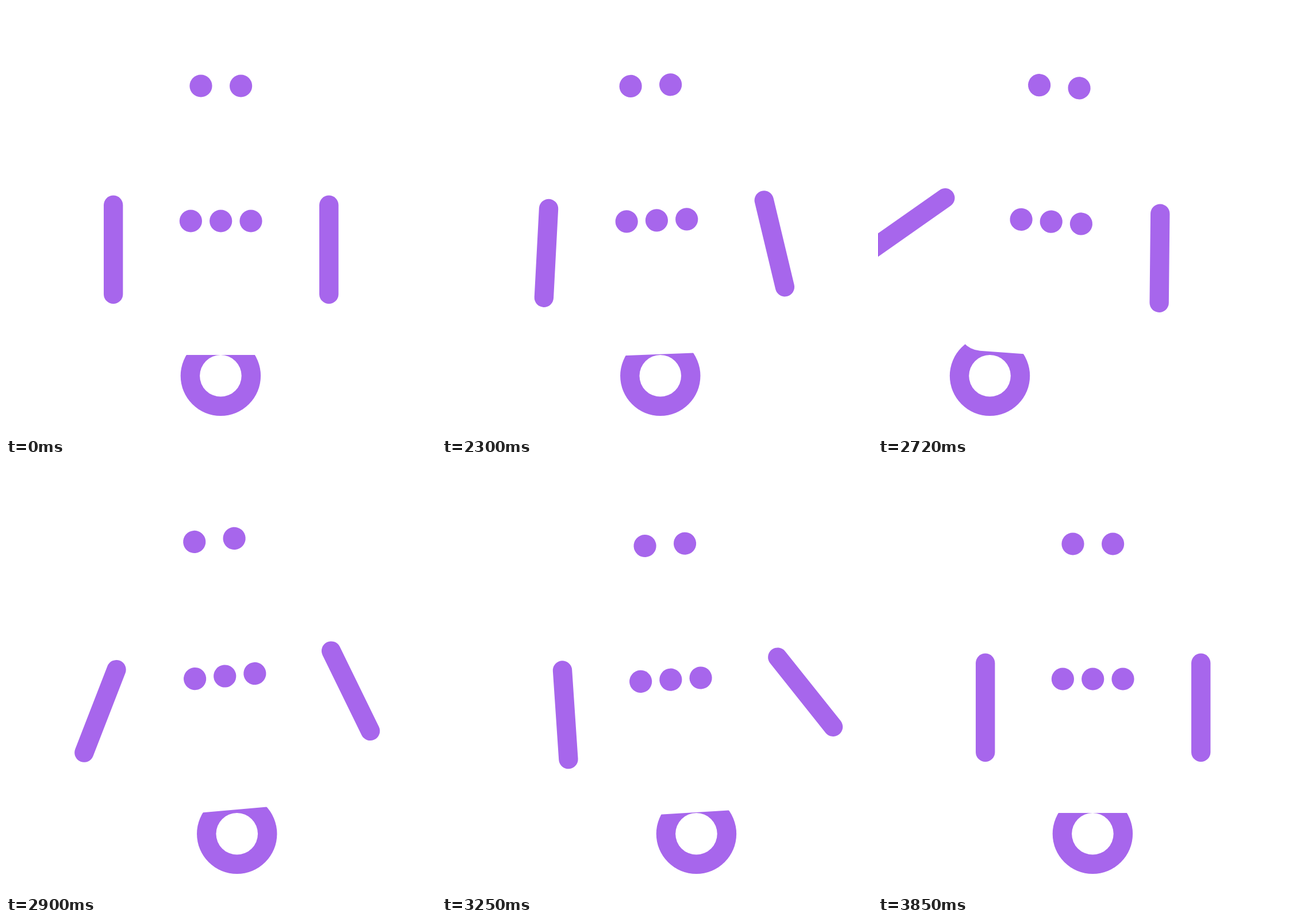
Animation, 748 px wide and 748 px high, one loop 4.02 s. Source, as an HTML page with a canvas:

```html
<!DOCTYPE html>
<html lang="en">
<head>
<meta charset="utf-8">
<title>Unicycle robot</title>
<style>
  html, body { margin: 0; height: 100%; overflow: hidden; background: #fff; }
  canvas { display: block; }
</style>
</head>
<body>
<canvas width="748" height="748"></canvas>
<script>
const ctx = document.querySelector('canvas').getContext('2d');
const LOOP = 4020, START = 2020, END = 3850;
const PURPLE = '#a766ec', WHITE = '#fff';
const RAD = Math.PI / 180;

// Balancing act: key poses, joined by smooth monotone curves
const times = [2000, 2020, 2180, 2500, 2670, 2900, 3085, 3250, 3470, 3550, 3690, 3850];
const tracks = {
  wheel:    [0, 1.5, 50, -128.5, -200, 27.5, 165, 69.5, -16.5, -24, 8, 0],
  x:        [0, 0.7, 17, -53.2, -80.5, 6.7, 61, 24.3, -5.2, -7, 2.5, 0],
  y:        [0, 0, -2, 1.3, 2, -5, 1, 1.2, 0, 0.5, 0, 0],
  tilt:     [0, -0.2, -4, 3, 5.2, -4.95, -9.5, -3.53, 2.37, 2.8, -0.8, 0],
  headX:    [0, 0, -2, -0.8, -4, 2.2, 0, 4.2, 10.9, 8, -2, 0],
  headY:    [0, 0, 0, 0, 0, -2.3, 0, 0, 2.4, 1.5, 0, 0],
  leftArm:  [0, -0.2, -4, 29.3, 58, 21.4, -12, -3.9, 7.3, 15.5, -6, 0],
  rightArm: [0, -0.2, -18, -1, 3, -25.9, -55, -38.7, 6.5, 8, -12, 0]
};

function slope(keys, i) {
  if (i === 0 || i === keys.length - 1) return 0;
  const a = (keys[i] - keys[i - 1]) / (times[i] - times[i - 1]);
  const b = (keys[i + 1] - keys[i]) / (times[i + 1] - times[i]);
  return a * b > 0 ? 2 * a * b / (a + b) : 0;
}

function sample(keys, t) {
  if (t < START || t >= END) return 0;
  const i = times.findIndex(k => k > t) - 1;
  const span = times[i + 1] - times[i], u = (t - times[i]) / span, v = 1 - u;
  return v * v * (1 + 2 * u) * keys[i] + u * u * (3 - 2 * u) * keys[i + 1]
    + span * u * v * (v * slope(keys, i) - u * slope(keys, i + 1));
}

function disc(x, y, r, color = PURPLE) {
  ctx.fillStyle = color;
  ctx.beginPath();
  ctx.arc(x, y, r, 0, 2 * Math.PI);
  ctx.fill();
}

function arm(x, y, angle) {
  ctx.save();
  ctx.translate(x, y);
  ctx.rotate(angle * RAD);
  ctx.strokeStyle = PURPLE;
  ctx.lineWidth = 33.4;
  ctx.lineCap = 'round';
  ctx.beginPath();
  ctx.moveTo(0, 0);
  ctx.lineTo(0, 155);
  ctx.stroke();
  ctx.restore();
}

function draw(t) {
  const p = {};
  for (const name in tracks) p[name] = sample(tracks[name], t);
  ctx.fillStyle = WHITE;
  ctx.fillRect(0, 0, 748, 748);

  const wheelX = 373.4 + p.wheel;
  disc(wheelX, 643.3, 69.7);
  disc(wheelX, 643.3, 36.3, WHITE);

  ctx.save();
  ctx.translate(373.7 + p.x, 374 + p.y);
  ctx.rotate(p.tilt * RAD);
  // The white torso hides the top of the wheel
  ctx.fillStyle = WHITE;
  ctx.beginPath();
  ctx.roundRect(-150, -190, 300, 423, 43);
  ctx.fill();
  arm(-187, -27.7, p.leftArm - p.tilt);
  arm(188, -27.7, p.rightArm - p.tilt);
  for (const i of [-1, 0, 1]) disc(i * 52.3, 0, 19.6);
  for (const i of [-1, 1]) disc(0.1 + i * 34.8 + p.headX, -235 + p.headY, 19.6);
  ctx.restore();
}

const origin = performance.now();
function tick() {
  draw((performance.now() - origin) % LOOP);
  requestAnimationFrame(tick);
}
tick();
</script>
</body>
</html>
```
